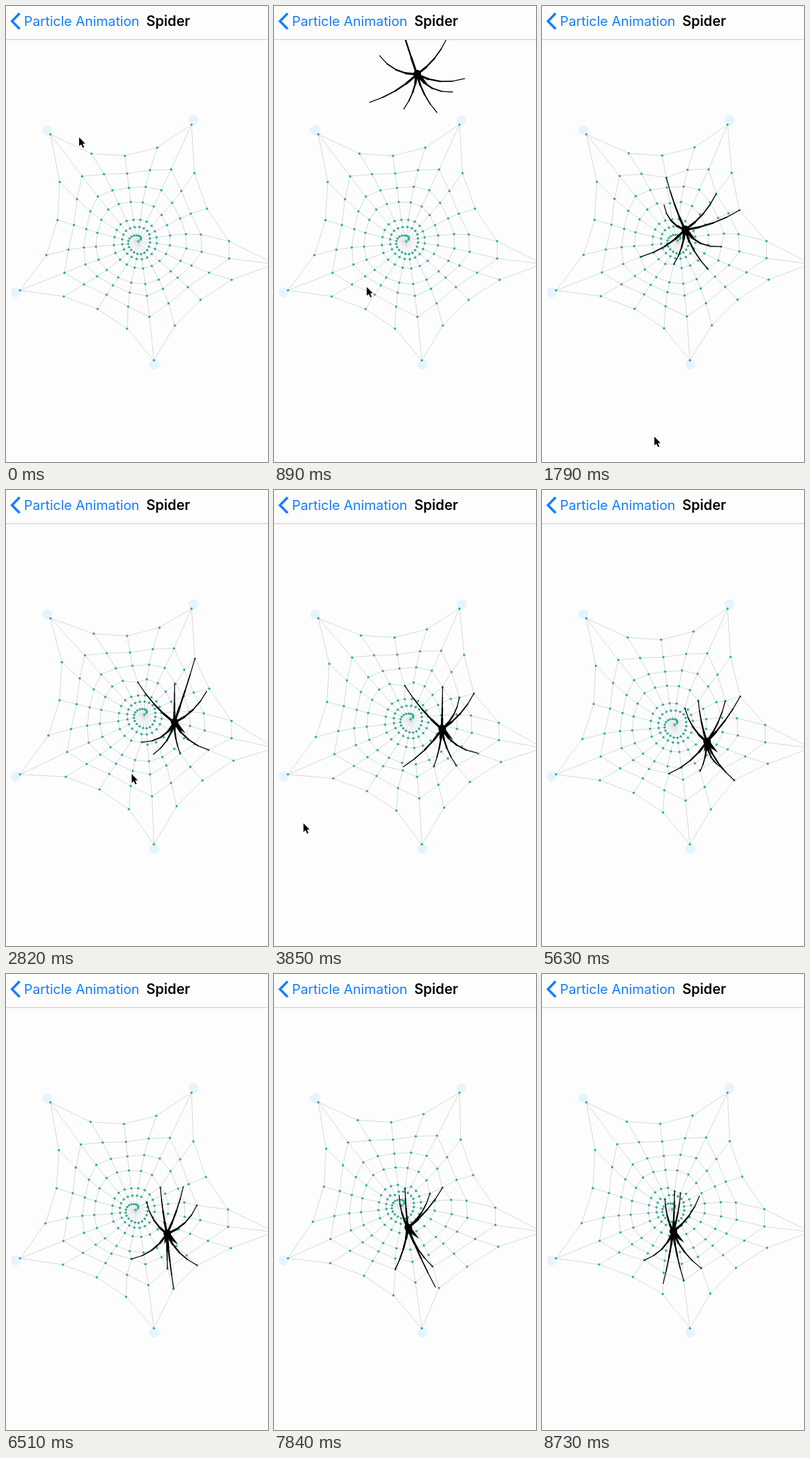
Write an HTML page with a canvas that moves like this. It is 394 px wide and 684 px high and loops after 8780 ms.

```html
<!DOCTYPE html>
<html lang="en">
<head>
<meta charset="utf-8">
<title>Spider</title>
<style>
  html, body { margin: 0; width: 100%; height: 100%; overflow: hidden; background: #fdfdfd; }
  canvas, svg { position: absolute; left: 0; top: 0; display: block; }
  text { font: 20.3px Inter, "Liberation Sans", sans-serif; }
  .title { font-size: 20.9px; font-weight: 600; }
</style>
</head>
<body>
<canvas id="stage" width="394" height="684"></canvas>
<svg width="394" height="51">
  <rect width="394" height="50" fill="#fdfdfd"/>
  <rect y="50" width="394" height="1" fill="#c9c9cb"/>
  <path d="M20.5 11 9 22.7 20.5 34.5" fill="none" stroke="#147efb" stroke-width="3.6"/>
  <text x="27" y="30" fill="#147efb">Particle Animation</text>
  <text x="211" y="30" class="title">Spider</text>
</svg>
<script>
const ctx = document.getElementById('stage').getContext('2d');
const LOOP = 8780, STEP = 148, LAST = 59, LANDING = 9;
const SEGMENTS = 20, DEPTH = 7, COUNT = SEGMENTS * DEPTH, HUB = COUNT - 1;
const LEGS = 8, STRIDE = 10;
const PINS = [[412, 388], [223, 538], [14.5, 429.5], [62, 186.5], [282, 171.5]];

// Key points as [step, x, y].
const BODY = [[12, 215, 336], [19, 253, 349], [33, 252, 369], [44, 242, 390], [53, 200, 381], [59, 197, 387]];
const CENTER = [[7, 199, 353], [12, 204, 352], [19, 208, 337], [33, 203, 351], [44, 195, 354], [53, 192, 347], [59, 196, 353]];
const CURSOR = [[0, 109, 196], [12, 168, 645], [19, 188, 425], [28, 2, 520], [33, 310, 616], [35, 325, 690]];

const clamp = v => Math.max(0, Math.min(1, v));
const smooth = v => v * v * (3 - 2 * v);
const mix = (a, b, v) => a + (b - a) * v;
const radians = deg => deg * Math.PI / 180;

// Repeatable noise in -1..1 for a pair of integers.
const noise = (a, b) => {
  const s = Math.sin(a * 12.99 + b * 78.23) * 43758.5;
  return (s - Math.floor(s)) * 2 - 1;
};

function track(rows, n, ease = smooth) {
  let k = 0;
  while (k < rows.length - 2 && n >= rows[k + 1][0]) k++;
  const [from, to] = [rows[k], rows[k + 1]];
  const u = ease(clamp((n - from[0]) / (to[0] - from[0])));
  return [mix(from[1], to[1], u), mix(from[2], to[2], u)];
}

// Spiral web of springs, settled under gravity.
const links = [];
const web = buildWeb();

function buildWeb() {
  const radius = 204, nodes = [];
  for (let i = 0; i < COUNT; i++) {
    const a = i * 2 * Math.PI / SEGMENTS + Math.cos(i * 0.4) * 0.05 + Math.cos(i * 0.05) * 0.2;
    const r = radius * (1 - i / COUNT) + Math.cos(i * 0.1) * 20;
    const x = 196.5 + Math.cos(a) * r;
    const y = 328 + Math.sin(a) * r + Math.cos(a * 2.1) * radius / DEPTH * 0.2;
    nodes.push({ x, y, px: x, py: y });
  }
  const link = (i, j) => {
    const a = nodes[i], b = nodes[j];
    links.push({ i, j, a, b, rest: Math.hypot(a.x - b.x, a.y - b.y) * 0.3 });
  };
  for (let i = 0; i < HUB; i++) {
    link(i, i + 1);
    link(i, Math.min(i + SEGMENTS, HUB));
  }
  link(0, SEGMENTS - 1);
  for (let round = 0; round < 400; round++) {
    for (const p of nodes) {
      const vx = (p.x - p.px) * 0.9, vy = (p.y - p.py) * 0.9;
      p.px = p.x; p.py = p.y;
      p.x += vx; p.y += vy + 0.25;
    }
    for (let s = 0; s < 16; s++) {
      PINS.forEach(([x, y], k) => Object.assign(nodes[k * 4], { x, y }));
      for (const { a, b, rest } of links) {
        const dx = a.x - b.x, dy = a.y - b.y, m = dx * dx + dy * dy;
        const f = (rest * rest - m) / m * 0.6 / 16;
        a.x += dx * f; a.y += dy * f;
        b.x -= dx * f; b.y -= dy * f;
      }
    }
  }
  return nodes.map(p => [p.x, p.y]);
}

// The web follows its hub; pinned nodes stay.
function swayedWeb(n) {
  const [cx, cy] = track(CENTER, n);
  const ox = cx - web[HUB][0], oy = cy - web[HUB][1];
  return web.map(([x, y], i) => {
    const f = i < SEGMENTS && i % 4 === 0 ? 0 : 0.3 + 0.7 * i / HUB;
    return [x + ox * f, y + oy * f];
  });
}

function nearestNode(x, y) {
  const distance = ([nx, ny]) => Math.hypot(nx - x, ny - y);
  return web.reduce((best, p, i) => distance(p) < distance(web[best]) ? i : best, 0);
}

// Four legs fan upwards and four downwards; the fans close over time.
function legAngle(leg, n) {
  const age = clamp(n / LAST), slot = leg % 4 - 1.5;
  return radians(leg < 4 ? -80 + slot * mix(50, 12, age) : 90 + slot * mix(45, 20, age));
}

function foothold(leg, stride, offset) {
  const n = (stride + 0.6 - offset) * STRIDE;
  const [x, y] = track(BODY, n);
  const reach = (leg < 4 ? mix(95, 62, clamp(n / LAST)) : 70) + 16 * noise(leg, stride);
  const a = legAngle(leg, n);
  return nearestNode(x + Math.cos(a) * reach, y + Math.sin(a) * reach);
}

// Legs step in turn from node to node and tug the nodes they hold.
function spiderAt(n, nodes) {
  const drop = n < LANDING ? -420 * (1 - (n / LANDING) ** 2) : 0;
  const [x, y] = track(BODY, n);
  const rest = nodes.map(p => [...p]);
  const tug = (node, grip) => {
    const [nx, ny] = rest[node], pull = 0.08 * grip;
    const held = [mix(nx, x, pull), mix(ny, y, pull)];
    if (!drop && grip) nodes[node] = held;
    return held;
  };
  const feet = Array.from({ length: LEGS }, (_, leg) => {
    const offset = leg * 3 % LEGS / LEGS;
    const cycle = n / STRIDE + offset, stride = Math.floor(cycle);
    const v = smooth(clamp((cycle - stride) / 0.3));
    const from = tug(foothold(leg, stride - 1, offset), 1 - v);
    const to = tug(foothold(leg, stride, offset), v);
    return [mix(from[0], to[0], v), mix(from[1], to[1], v) + drop];
  });
  return { x, y: y + drop, feet };
}

function dot(x, y, r, color) {
  ctx.fillStyle = color;
  ctx.beginPath();
  ctx.arc(x, y, r, 0, 7);
  ctx.fill();
}

function shape(...points) {
  ctx.fillStyle = '#000';
  ctx.beginPath();
  points.forEach(([x, y]) => ctx.lineTo(x, y));
  ctx.closePath();
  ctx.fill();
}

function drawWeb(nodes) {
  PINS.forEach(([x, y]) => dot(x, y, 7.5, '#e5f4ff'));
  ctx.strokeStyle = '#d5d8d9';
  ctx.lineWidth = 1;
  ctx.beginPath();
  for (const { i, j } of links) {
    ctx.moveTo(...nodes[i]);
    ctx.lineTo(...nodes[j]);
  }
  ctx.stroke();
  nodes.forEach(([x, y]) => dot(x, y, 1.75, '#2dad8f'));
}

function drawLeg(x, y, [fx, fy]) {
  const dx = fx - x, dy = fy - y, len = Math.hypot(dx, dy) || 1;
  const bend = 0.17 * Math.max(0, 115 - len) * dx / len;
  const joint = u => {
    const b = 4 * u * (1 - u) * bend / len;
    return [x + dx * u - dy * b, y + dy * u + dx * b];
  };
  for (let s = 0; s < 4; s++) {
    ctx.lineWidth = 3.2 * 0.74 ** s;
    ctx.beginPath();
    ctx.moveTo(...joint(s / 4));
    ctx.lineTo(...joint((s + 1) / 4));
    ctx.stroke();
  }
}

function drawSpider({ x, y, feet }) {
  ctx.strokeStyle = '#000';
  ctx.lineCap = 'round';
  feet.forEach(foot => drawLeg(x, y, foot));
  dot(x + 0.5, y - 1, 5.8, '#000');
  shape([x + 4, y - 2], [x + 17, y + 16], [x - 2, y + 4]);
  shape([x - 3, y], [x + 3, y + 2], [x - 4, y + 15]);
}

function drawCursor(x, y) {
  ctx.save();
  ctx.translate(x + 1, y + 1);
  ctx.lineWidth = 1.6;
  ctx.strokeStyle = '#fff';
  ctx.lineJoin = 'round';
  shape([0, 0], [0, 13], [3, 10.4], [5.4, 15.6], [7.5, 14.7], [5.2, 9.6], [9.2, 9.4]);
  ctx.stroke();
  ctx.fill();
  ctx.restore();
}

function draw(now) {
  let n = Math.floor((now % LOOP + 2) / STEP);
  if (n === 54) n = 53; // the picture rests for one step
  ctx.fillStyle = '#fdfdfd';
  ctx.fillRect(0, 0, 394, 684);
  const nodes = swayedWeb(n);
  const spider = spiderAt(n, nodes);
  drawWeb(nodes);
  drawSpider(spider);
  if (n < 35) drawCursor(...track(CURSOR, n, u => u));
  requestAnimationFrame(draw);
}
requestAnimationFrame(draw);
</script>
</body>
</html>
```
